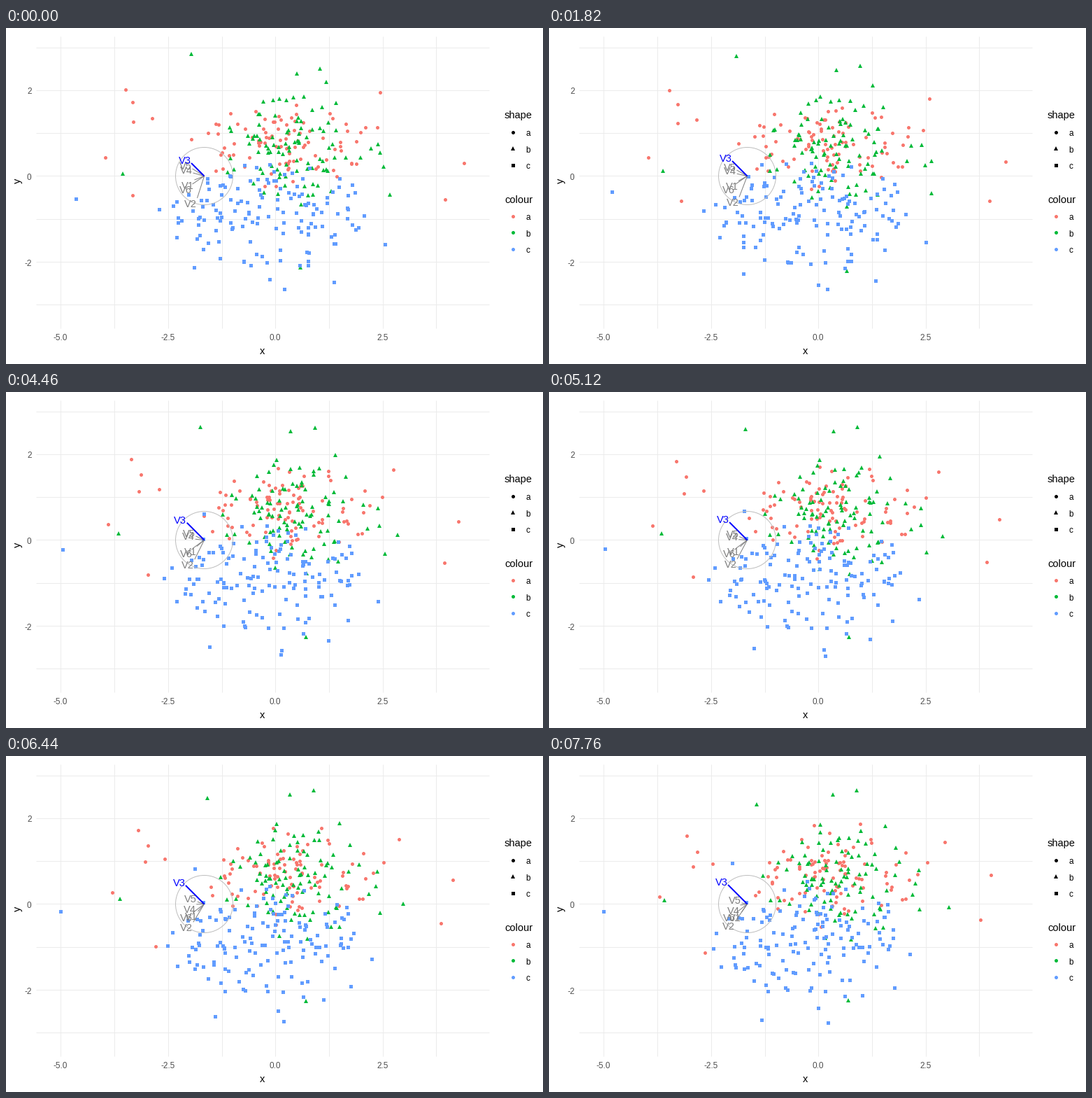
Write a matplotlib script that moves like this. It is 768 px wide and 480 px high and loops after 8000 ms.

```python
import numpy as np
import matplotlib.pyplot as plt
from matplotlib.animation import FuncAnimation
from matplotlib.collections import LineCollection

LOOP, INTERVAL = 8000, 40
FIRST, HOLD, STEPS = 500, 660, 12   # ms of first pose, of later poses, last step
ANGLE = 0.59                        # plane rotation over the whole loop, radians
PX = 0.75                           # points per pixel at 96 dpi
ORIGIN = np.array([384.5, 211.5])
HUB = np.array([283.5, 211.5])
RED, GREEN, BLUE = "#F8766D", "#00BA38", "#619CFF"

plt.rcParams["font.family"] = "Liberation Sans"
rng = np.random.default_rng(7)

fig = plt.figure(figsize=(8, 5), dpi=96, facecolor="white")
ax = fig.add_axes([0, 0, 1, 1])
ax.set_xlim(0, 768)
ax.set_ylim(480, 0)
ax.axis("off")


def cloud(count, centre, spread):
    """Rows of x, y, shift: a truncated normal cloud seen before a rotation."""
    z = rng.normal(size=(count * 3, 2))
    z = z[np.hypot(*z.T) < 1.9][:count]
    pos = np.array(centre) + z * spread
    depth = (pos - ORIGIN).sum(axis=1) / 2
    shift = depth * (np.cos(ANGLE) - 1) + rng.normal(2, 16, len(pos))
    return np.column_stack([pos, shift])


def rotate(points, centre, s):
    """Turn along the diagonal by the fraction s of the full angle."""
    start, shift = points[:, :2], points[:, 2]
    q0 = (start - centre).sum(axis=1) / 2
    q = (q0 * np.sin(ANGLE * (1 - s)) + (q0 + shift) * np.sin(ANGLE * s)) / np.sin(ANGLE)
    return start + (q - q0)[:, None]


def label(x, y, text, size=11.73, color="#4D4D4D", ha="center", **kw):
    return ax.text(x, y, text, fontsize=size * PX, color=color, ha=ha,
                   va="center_baseline", **kw)


def markers(xy, shape, color):
    size = 6.2 if shape == "^" else 5
    return ax.plot(*np.transpose(xy), shape, ms=size * PX, mfc=color, mew=0)[0]


# Panel grid and axes
grid = [[(x, 12), (x, 429)] for x in 78.4 + 76.72 * np.arange(8)]
grid += [[(43, y), (691, y)] for y in 27.52 + 61.32 * np.arange(7)]
ax.add_collection(LineCollection(grid, colors="#EBEBEB", linewidths=PX, zorder=0))
for i, text in enumerate(["-5.0", "-2.5", "0.0", "2.5"]):
    label(78 + 153.5 * i, 442, text)
for i, text in enumerate(["2", "0", "-2"]):
    label(36.5, 90 + 122.5 * i, text, ha="right")
label(366.5, 460, "x", 14.67, "black")
label(17, 220, "y", 14.67, "black", rotation=90)

# Legends
for title, y, shapes, colors in [
    ("shape", 124, "o^s", ["black"] * 3),
    ("colour", 244, "ooo", [RED, GREEN, BLUE]),
]:
    label(713, y, title, 14.67, "black", "left")
    for i, name in enumerate("abc"):
        row = y + 25 + 23.3 * i
        markers([(725, row)], shapes[i], colors[i])
        label(743, row + 1, name, color="black", ha="left")

# Data: a few far points (x, y, shift) around a random cloud
groups = []
for shape, color, far, rest in [
    ("o", RED,
     [(171, 88, 26), (181, 106, 31), (182, 134, 24), (209, 129, 25), (142, 185, 16),
      (181, 239, 42), (655, 193, -23), (628, 245, -11), (535, 92, 31)],
     cloud(93, (405, 168), (76, 38))),
    ("^", GREEN,
     [(265, 37, 32), (416, 65, -10), (449, 58, -9), (458, 77, 23),
      (549, 238, -19), (167, 208, -2), (421, 342, 7)],
     cloud(92, (424, 174), (68, 42))),
    ("s", BLUE,
     [(100, 244, -22), (219, 259, 16), (269, 342, 35), (377, 359, 22),
      (398, 373, -13), (469, 363, -21), (542, 309, -26), (320, 211, -58)],
     cloud(136, (375, 267), (76, 42))),
]:
    points = np.vstack([far, rest])
    groups.append((points, markers(points[:, :2], shape, color)))

# Projected variables: line end and shift; labels sit outward of the ends
names = ["V1", "V2", "V4", "V5", "V6", "V3"]
ends = np.array([(269.5, 217, 6), (273.5, 243, -7), (267.5, 207, 6),
                 (266.5, 201, 9), (266.5, 223, 1), (265, 193, -9)])
tones = ["#7F7F7F"] * 5 + ["#0000FF"]
ax.add_patch(plt.Circle(HUB, 41, fill=False, ec="#BEBEBE", lw=PX, zorder=3))
spokes = LineCollection([], colors=tones, linewidths=[PX] * 5 + [2 * PX], zorder=4)
ax.add_collection(spokes)
tags = [label(0, 0, name, 14.6, tone, zorder=5) for name, tone in zip(names, tones)]


def update(frame):
    ms = (frame + 0.5) * INTERVAL
    step = 0 if ms < FIRST else 1 + (ms - FIRST) // HOLD
    s = step / STEPS
    for points, line in groups:
        line.set_data(*rotate(points, ORIGIN, s).T)
    tips = rotate(ends, HUB, s)
    spokes.set_segments([[HUB, tip] for tip in tips])
    for tag, (x, y) in zip(tags, tips):
        tag.set_position((x - 9.5, y + (7 if y > HUB[1] else -4.5)))
    return [line for _, line in groups] + [spokes] + tags


anim = FuncAnimation(fig, update, frames=LOOP // INTERVAL, interval=INTERVAL,
                     repeat=True, repeat_delay=0, blit=False)
plt.show()
```
